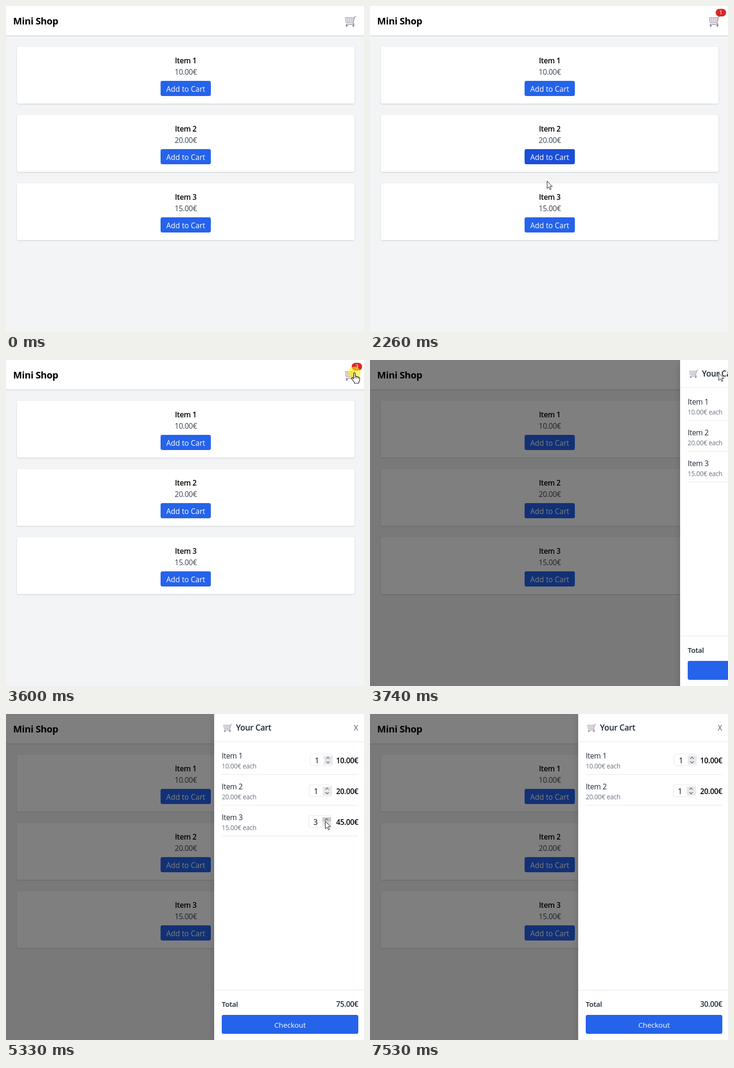
Recreate the animation shown at these times as an HTML page. Size 755 by 688 pixels, loop 8000 ms.

```html
<!DOCTYPE html>
<html lang="en">
<head>
<meta charset="utf-8">
<title>Mini Shop</title>
<style>
  html, body { margin: 0; width: 100%; height: 100%; overflow: hidden; background: #f3f4f6; }
  svg { display: block; width: 755px; height: 688px; }
  text { font-family: "Open Sans", "Noto Sans", sans-serif; white-space: pre; }
  .tight { letter-spacing: -.02em; }
  .card { filter: drop-shadow(0 1px 1.5px rgba(0,0,0,.16)); }
  .panel { filter: drop-shadow(0 6px 7px rgba(0,0,0,.16)); }
</style>
</head>
<body>
<svg id="stage" viewBox="0 0 755 688">
  <defs>
    <g id="cart" fill="none" stroke-linejoin="round" stroke-linecap="round">
      <path d="M1.5 4.5H20L17.5 15.5H3.5Z" fill="#f1eff3" stroke="#aaa5ae" stroke-width="1.3"/>
      <path d="M2 8H19M3 11.8H18M6 4.5L7 15.5M10.5 4.5V15.5M15 4.5L14 15.5" stroke="#b7b2bb"/>
      <path d="M24 1.8L21.3 3L17.6 15.8L20.6 18.8H3" stroke="#a89dac" stroke-width="1.7"/>
      <g fill="#4a5fc1"><circle cx="4.6" cy="21.8" r="1.7"/><circle cx="18.6" cy="21.8" r="1.7"/></g>
    </g>
    <g id="arrow">
      <path d="M.5 .5V16.2L4.1 12.7L6.8 18.5L9.2 17.4L6.6 11.8H11.5Z" fill="#fff" stroke="#111" stroke-linejoin="round"/>
    </g>
    <g id="hand">
      <path d="M-1.6 1.4Q0-1.2 1.6 1.4V7.5Q3.6 6.4 4.8 8.2Q6.8 7.2 8 9.2Q10.6 8.6 10.8 11.4V15.5Q10.6 18 9 19.5V22H-.3V20L-6 12.6Q-6.6 9.8-4.2 10.2L-1.6 12.8Z"
        fill="#fff" stroke="#111" stroke-width="1.2" stroke-linejoin="round"/>
      <path d="M1.6 7.5V11.5M4.8 8.2V12M8 9.2V12.5" stroke="#111"/>
    </g>
    <g id="beam">
      <path d="M-3-8.5H-1L0-7.5L1-8.5H3M0-7.5V7.5M-3 8.5H-1L0 7.5L1 8.5H3" fill="none" stroke="#111"/>
    </g>
  </defs>
</svg>
<script>
const LOOP = 8000, STEP = 200 / 3;
const BLUE = '#2563eb', BLUE_HOVER = '#1d4ed8', LINE = '#e5e7eb';
const stage = document.getElementById('stage');

function add(parent, tag, attrs = {}) {
  const node = document.createElementNS('http://www.w3.org/2000/svg', tag);
  set(node, attrs);
  parent.appendChild(node);
  return node;
}
function set(node, attrs) {
  for (const key in attrs) node.setAttribute(key, attrs[key]);
}
const show = (node, on) => set(node, { visibility: on ? 'visible' : 'hidden' });
const move = (node, x, y) => set(node, { transform: `translate(${x} ${y})` });
const rect = (parent, x, y, width, height, fill, more) =>
  add(parent, 'rect', { x, y, width, height, fill, ...more });

function label(parent, x, y, str, size, fill, more) {
  const node = add(parent, 'text', { x, y, 'font-size': size, fill, ...more });
  node.textContent = str;
  return node;
}
const tight = { class: 'tight' };
const bold = { class: 'tight', 'font-weight': 600 };
const middle = { 'text-anchor': 'middle' };
const end = { 'text-anchor': 'end' };
const euro = n => n.toFixed(2) + '€';

// Shop page
rect(stage, 0, 0, 755, 688, '#f3f4f6');
rect(stage, -5, 0, 765, 62, '#fff', { class: 'card' });
label(stage, 15, 39, 'Mini Shop', 20, '#000', { class: 'tight', 'font-weight': 700 });
add(stage, 'use', { href: '#cart', x: 714, y: 20 });

const prices = [10, 20, 15];
const buttons = prices.map((price, i) => {
  const g = add(stage, 'g');
  move(g, 0, 144 * i);
  rect(g, 23, 86, 712, 120, '#fff', { rx: 4, class: 'card' });
  label(g, 379, 121, 'Item ' + (i + 1), 15.5, '#000', { ...bold, ...middle });
  label(g, 379.3, 145, euro(price), 15.5, '#374151', { ...tight, ...middle });
  const button = rect(g, 326, 158, 106, 32, BLUE, { rx: 4 });
  label(g, 379, 181, 'Add to Cart', 15.5, '#fff', middle);
  return button;
});

const badge = add(stage, 'g');
rect(badge, 729, 6, 22, 16, '#dc2626', { rx: 8 });
const badgeText = label(badge, 740, 18.3, '', 12, '#fff', middle);

// Cart drawer
const overlay = rect(stage, 0, 0, 755, 688, '#000', { opacity: .5 });
const panel = add(stage, 'g');
rect(panel, 0, 0, 330, 688, '#fff', { class: 'panel' });
add(panel, 'use', { href: '#cart', transform: 'translate(19 20) scale(.76)' });
label(panel, 46, 35, 'Your Cart', 17.2, '#1f2937', bold);
label(panel, 299, 35, 'X', 15.5, '#4b5563', middle);
rect(panel, 0, 58, 330, 1, LINE);

const rows = prices.map((price, i) => {
  const g = add(panel, 'g');
  move(g, 0, 65 * i);
  label(g, 16, 94, 'Item ' + (i + 1), 15.5, '#1f2937', tight);
  label(g, 16, 115, euro(price) + ' each', 13.56, '#6b7280', tight);
  const sum = label(g, 304, 104, euro(price), 15.5, '#000', { ...bold, ...end });
  const field = add(g, 'g');
  rect(field, .5, 84.5, 47, 25, '#fff', { rx: 3.5, stroke: LINE });
  const ring = rect(field, -.5, 83.5, 49, 27, 'none', { rx: 4, stroke: '#101010', 'stroke-width': 1.5 });
  const mark = rect(field, 10, 87, 10, 20, '#3390ff');
  const qty = label(field, 10.5, 104, '1', 15.5, '#000');
  const up = rect(field, 29, 88, 18, 9.5, '#e8e8eb');
  const down = rect(field, 29, 97.5, 18, 9.5, '#e8e8eb');
  add(field, 'path', {
    d: 'M34.5 94.5L38 91L41.5 94.5M34.5 100L38 103.5L41.5 100',
    fill: 'none', stroke: '#5f6066', 'stroke-width': 1.3
  });
  rect(g, 16, 127, 288, 1, LINE);
  move(field, [202, 200, 202][i], 0);
  return { g, sum, field, ring, mark, qty, up, down };
});
rect(panel, 0, 582, 330, 1, LINE);
label(panel, 16, 618, 'Total', 15.2, '#1f2937', bold);
const total = label(panel, 304, 618, '', 15.5, '#1f2937', { ...bold, ...end });
rect(panel, 16, 635, 288, 40, BLUE, { rx: 4 });
label(panel, 160, 662, 'Checkout', 15.3, '#fff', middle);

// Pointer
const glow = add(stage, 'circle', { r: 13, fill: '#fff000', opacity: .6 });
const pointers = {};
for (const kind of ['arrow', 'hand', 'beam']) pointers[kind] = add(stage, 'use', { href: '#' + kind });

const path = [
  [180, 645, 655], [380, 574, 580], [500, 562, 545], [720, 500, 300], [860, 464, 196],
  [1009, 428, 192], [1400, 378, 178], [1720, 378, 178], [1990, 376, 322], [2210, 376, 322],
  [2276, 373, 369], [2480, 374, 462], [2740, 374, 462], [2930, 545, 325], [3070, 723, 163],
  [3143, 734, 100], [3420, 734, 27], [3743, 735, 27], [3820, 735, 32], [4143, 703, 185],
  [4543, 674, 231], [4960, 674, 231], [5076, 673, 226], [5440, 673, 226], [5740, 663, 229], [LOOP, 663, 229]
];
const presses = [[1520, 1650], [2060, 2190], [2530, 2660], [3530, 3740], [4720, 4860],
  [5070, 5200], [5260, 5330], [5920, 5980], [6120, 6180]];
const adds = [1590, 2330, 2730];

function pointerAt(t) {
  const i = Math.max(1, path.findIndex(p => p[0] >= t));
  const [t0, x0, y0] = path[i - 1], [t1, x1, y1] = path[i];
  const k = Math.min(1, Math.max(0, (t - t0) / (t1 - t0)));
  return [x0 + (x1 - x0) * k, y0 + (y1 - y0) * k];
}
function buttonUnder([x, y]) {
  return prices.findIndex((_, i) => x > 326 && x < 432 && y > 158 + 144 * i && y < 190 + 144 * i);
}
// cubic-bezier(.4, 0, .2, 1)
function ease(p) {
  if (p <= 0 || p >= 1) return p <= 0 ? 0 : 1;
  let lo = 0, hi = 1;
  for (let i = 0; i < 20; i++) {
    const s = (lo + hi) / 2, r = 1 - s;
    if (1.2 * s * r * r + .6 * s * s * r + s ** 3 < p) lo = s; else hi = s;
  }
  return lo * lo * (3 - 2 * lo);
}

function drawShop(t, open) {
  const hover = open ? -1 : buttonUnder(pointerAt(t - 70));
  buttons.forEach((b, i) => set(b, { fill: i === hover ? BLUE_HOVER : BLUE }));
  const count = adds.filter(a => t >= a).length;
  show(badge, count > 0);
  badgeText.textContent = count;
  const since = t - adds[count - 1];
  move(badge, 0, since < 500 ? -4 * Math.cos(Math.PI * since / 1000) : 0);
}

function drawCart(t, open, [x, y]) {
  show(overlay, open);
  panel.setAttribute('display', open ? 'inline' : 'none');
  if (!open) return;
  move(panel, Math.round(759 - 320 * ease((t - 3657) / 300)), 0);
  const last = rows[2];
  const qty = t >= 7530 ? 0 : t >= 5260 ? 3 : t >= 5130 ? 2 : 1;
  last.g.setAttribute('display', qty ? 'inline' : 'none');
  last.qty.textContent = qty;
  last.sum.textContent = euro(15 * qty);
  move(last.field, qty > 1 ? 199 : 202, 0);
  total.textContent = euro(30 + 15 * qty);
  const over = t > 4500 && x > 668;
  set(last.up, { fill: over && y < 228 ? '#c9c9ce' : '#e8e8eb' });
  set(last.down, { fill: over && y >= 228 ? '#c9c9ce' : '#e8e8eb' });
  rows.forEach((r, i) => {
    r.ring.setAttribute('display', i === 2 && t >= 5920 ? 'inline' : 'none');
    r.mark.setAttribute('display', i === 2 && t >= 6120 ? 'inline' : 'none');
  });
  set(last.qty, { fill: t >= 6120 ? '#fff' : '#000' });
}

function drawPointer(t, open, [x, y]) {
  const onCart = !open && x > 712 && y < 46;
  const kind = open ? (t > 5450 && x < 668 ? 'beam' : 'arrow')
    : onCart || buttonUnder([x, y]) >= 0 ? 'hand' : 'arrow';
  const visible = t >= 180 && t < 6990;
  for (const key in pointers) {
    show(pointers[key], visible && key === kind);
    move(pointers[key], Math.round(x), Math.round(y));
  }
  show(glow, presses.some(([a, b]) => t >= a && t < b));
  move(glow, x, y);
}

function render(now) {
  // The screen refreshes fifteen times a second.
  const t = Math.floor((now % LOOP - 46) / STEP) * STEP + 76;
  const open = t >= 3740, at = pointerAt(t);
  drawShop(t, open);
  drawCart(t, open, at);
  drawPointer(t, open, at);
}

const start = performance.now();
function tick() {
  render(performance.now() - start);
  requestAnimationFrame(tick);
}
tick();
</script>
</body>
</html>
```
